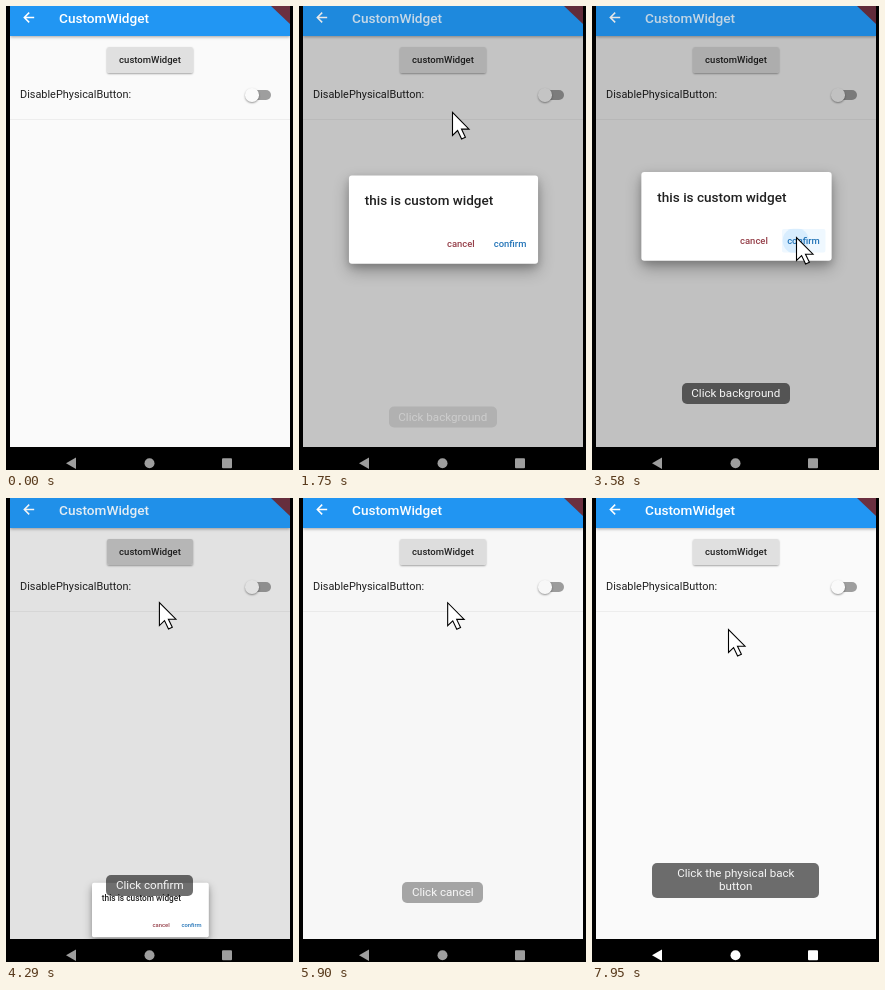
Animation of 287x464 px, one loop 8000 ms. Source, as an HTML page:

```html
<!DOCTYPE html>
<html lang="en">
<head>
<meta charset="utf-8">
<title>CustomWidget</title>
<style>
html, body { margin: 0; width: 100%; height: 100%; overflow: hidden; background: #000; }
body { position: relative; font-family: Roboto, sans-serif; color: #212121; }
div, svg { position: absolute; }
.text { white-space: nowrap; line-height: 20px; height: 20px; }
.center { text-align: center; }
#screen { left: 4px; top: 0; width: 280px; height: 441px; overflow: hidden; background: #fafafa; }
#stage { left: -4px; top: 0; width: 287px; height: 464px; }
#bar { left: 4px; top: 0; width: 280px; height: 30px; background: #2196f3; box-shadow: 0 1px 3px rgba(0,0,0,.35); }
#title { left: 53px; top: 2px; font-size: 13.62px; font-weight: 500; color: #fff; }
#button { left: 101px; top: 41px; width: 86px; height: 25.5px; border-radius: 2px; overflow: hidden; background: #e0e0e0; }
#buttonShadow { left: 101px; top: 41px; width: 86px; height: 25.5px; border-radius: 2px; box-shadow: 0 1px 2px rgba(0,0,0,.35); }
#buttonText { left: 0; top: 2.5px; width: 86px; font-size: 9.53px; font-weight: 500; }
#press { inset: 0; background: #000; }
#label { left: 14px; top: 79px; font-size: 10.9px; }
#rule { left: 4px; top: 113px; width: 280px; height: 1px; background: #ededed; }
#track { left: 243px; top: 84px; width: 21.5px; height: 9.5px; border-radius: 5px; background: #9e9e9e; }
#thumb { left: 239.3px; top: 82px; width: 13.6px; height: 13.6px; border-radius: 50%; background: #fafafa; box-shadow: 0 1px 2px rgba(0,0,0,.4); }
.shade { left: 4px; width: 280px; background: #000; }
#shadeBar { top: 0; height: 30px; }
#shadeBody { top: 30px; height: 411px; }
#dialog { left: 48.5px; top: 164px; width: 190.5px; height: 89px; border-radius: 3px; background: #fff;
  box-shadow: 0 7px 16px rgba(0,0,0,.3), 0 3px 7px rgba(0,0,0,.16); }
#heading { left: 16px; top: 14.5px; font-size: 13.6px; font-weight: 500; }
.action { top: 57px; height: 24px; border-radius: 3px; overflow: hidden; }
.action .text { top: 1.5px; width: 100%; font-size: 9.53px; font-weight: 500; }
.tint { inset: 0; background: #2196f3; }
.wave { width: 26px; height: 26px; border-radius: 50%; background: #2196f3; }
#cancel { left: 94.5px; width: 37px; color: #96404a; }
#confirm { left: 140.5px; width: 44.5px; color: #2475b8; }
.toast { border-radius: 5px; background: rgba(0,0,0,.565); color: rgba(255,255,255,.94);
  font-size: 11.6px; line-height: 13.6px; text-align: center; white-space: nowrap; }
</style>
</head>
<body>
<div id="screen"><div id="stage">
  <div id="rule"></div>
  <div id="bar"></div>
  <div id="title" class="text">CustomWidget</div>
  <svg width="287" height="30" style="left:0;top:0">
    <path d="M28.2 11.5H18.8M23.2 6.6L18.3 11.5L23.2 16.4" fill="none" stroke="#fff" stroke-width="1.5"/>
    <path d="M265 0H284V18Z" fill="#6b3040"/>
  </svg>
  <div id="buttonShadow"></div>
  <div id="button"><div id="press"></div><div id="buttonText" class="text center">customWidget</div></div>
  <div id="label" class="text">DisablePhysicalButton:</div>
  <div id="track"></div><div id="thumb"></div>
  <div id="shadeBar" class="shade"></div>
  <div id="shadeBody" class="shade"></div>
  <div id="dialog">
    <div id="heading" class="text">this is custom widget</div>
    <div id="cancel" class="action"><div class="tint"></div><div class="wave"></div><div class="text center">cancel</div></div>
    <div id="confirm" class="action"><div class="tint"></div><div class="wave"></div><div class="text center">confirm</div></div>
  </div>
</div></div>
<svg id="nav" width="287" height="23" viewBox="0 441 287 23" style="left:0;top:441px">
  <path d="M60 457.3L70 451.5V463Z"/><circle cx="143.5" cy="457.3" r="5"/>
  <rect x="216" y="452.3" width="10" height="10" rx="1"/>
</svg>
<svg id="cursor" width="24" height="32" viewBox="-1 -1 24 32" style="left:-1px;top:-1px">
  <path d="M.5 .5V23.5L5.6 18.6L9.6 27L13.4 25.3L9.5 17.2H17Z" fill="#fff" stroke="#000" stroke-width="1.1"/>
</svg>
<script>
const LOOP = 8000, MOVE = 500;
const $ = id => document.getElementById(id);

// open time, close time
const shows = [[590, 1666], [2440, 3520], [4100, 5420], [6362, 7190]];
const presses = [550, 2430, 4070, 6330];
// text, width, centre y, height, enter time, leave time
const notes = [
  ["Click background", 108, 387.7, 21.5, 1666, 3600],
  ["Click confirm", 87, 387.7, 21.5, 3740, 5470],
  ["Click cancel", 81, 387.7, 21.5, 5610, 7230],
  ["Click the physical back<br>button", 167, 382.2, 35, 7380, 9000]
];
// time, x, y of the pointer tip
const path = [
  [30, 152, 464], [420, 152, 56], [640, 152, 56], [1130, 158, 117], [1290, 158, 117], [1340, 153, 106],
  [1750, 153, 106], [2300, 152, 55], [2440, 152, 55], [2540, 154, 90], [2960, 204, 231],
  [3600, 204, 231], [3900, 150, 56], [4160, 150, 56], [4700, 162, 254], [4750, 162, 254], [5060, 154, 234],
  [5500, 154, 234], [6050, 146, 56], [6380, 146, 56], [6770, 95, 400], [7020, 62, 455],
  [7260, 62, 455], [7850, 136, 131], [8000, 136, 131]
];

const clamp = v => Math.min(1, Math.max(0, v));
const ramp = (t, start, length) => clamp((t - start) / length);
const ease = v => v < .5 ? 4 * v ** 3 : 1 - 4 * (1 - v) ** 3;
const pulse = (t, start, rise, hold, fall) => ramp(t, start, rise) - ramp(t, start + rise + hold, fall);

const toasts = notes.map(([text, width, mid, height]) => {
  const el = document.createElement("div");
  el.className = "toast";
  el.innerHTML = text;
  el.style.cssText = `left:${143.8 - width / 2}px;top:${mid - height / 2}px;width:${width}px;` +
    `height:${height}px;padding-top:4px;box-sizing:border-box`;
  $("stage").append(el);
  return el;
});

function pointAt(t) {
  const i = path.findIndex(p => p[0] > t);
  if (i < 1) return path[0].slice(1);
  const [a, b] = [path[i - 1], path[i]];
  const k = ramp(t, a[0], b[0] - a[0]);
  return [a[1] + (b[1] - a[1]) * k, a[2] + (b[2] - a[2]) * k];
}

function ripple(id, t, start, x, y) {
  const [tint, wave] = $(id).children;
  const on = t >= start && t < start + 700;
  tint.style.opacity = on ? .07 * ramp(t, start, 50) : 0;
  wave.style.opacity = on ? .11 * (1 - ramp(t, start + 250, 250)) : 0;
  wave.style.transform = `translate(${x - 13}px,${y - 13}px) scale(${ramp(t, start, 80) + 2 * ramp(t, start + 80, 250)})`;
}

function draw(t) {
  const level = Math.max(...shows.map(([a, b]) => ramp(t, a, MOVE) - ramp(t, b, MOVE)));
  const away = 1 - ease(level);
  $("dialog").style.visibility = level > 0 ? "visible" : "hidden";
  $("dialog").style.transform = `translateY(${262 * away}px) scale(${1 - .5 * away})`;
  $("shadeBody").style.opacity = .26 * level;
  $("shadeBar").style.opacity = .11 * level;
  $("title").style.opacity = 1 - .2 * level;

  $("press").style.opacity = .11 * Math.max(...presses.map(p => pulse(t, p, 80, 120, 200)));
  ripple("confirm", t, 3500, 14, 12);
  ripple("cancel", t, 5400, 11, 13);

  notes.forEach(([, , , , start, end], i) => {
    const k = ramp(t, start, MOVE);
    toasts[i].style.opacity = k - ramp(t, end, 130);
    toasts[i].style.visibility = t > start && t < end + 130 ? "visible" : "hidden";
    toasts[i].style.transform = `translateY(${24 * (1 - ease(k))}px)`;
  });

  $("nav").style.fill = t < 7190 ? "#9e9e9e" : "#fff";
  const [x, y] = pointAt(t);
  $("cursor").style.visibility = t < 30 ? "hidden" : "visible";
  $("cursor").style.transform = `translate(${x}px,${y}px)`;
}

const begin = performance.now();
function tick() {
  draw((performance.now() - begin) % LOOP);
  requestAnimationFrame(tick);
}
draw(0);
requestAnimationFrame(tick);
</script>
</body>
</html>
```
